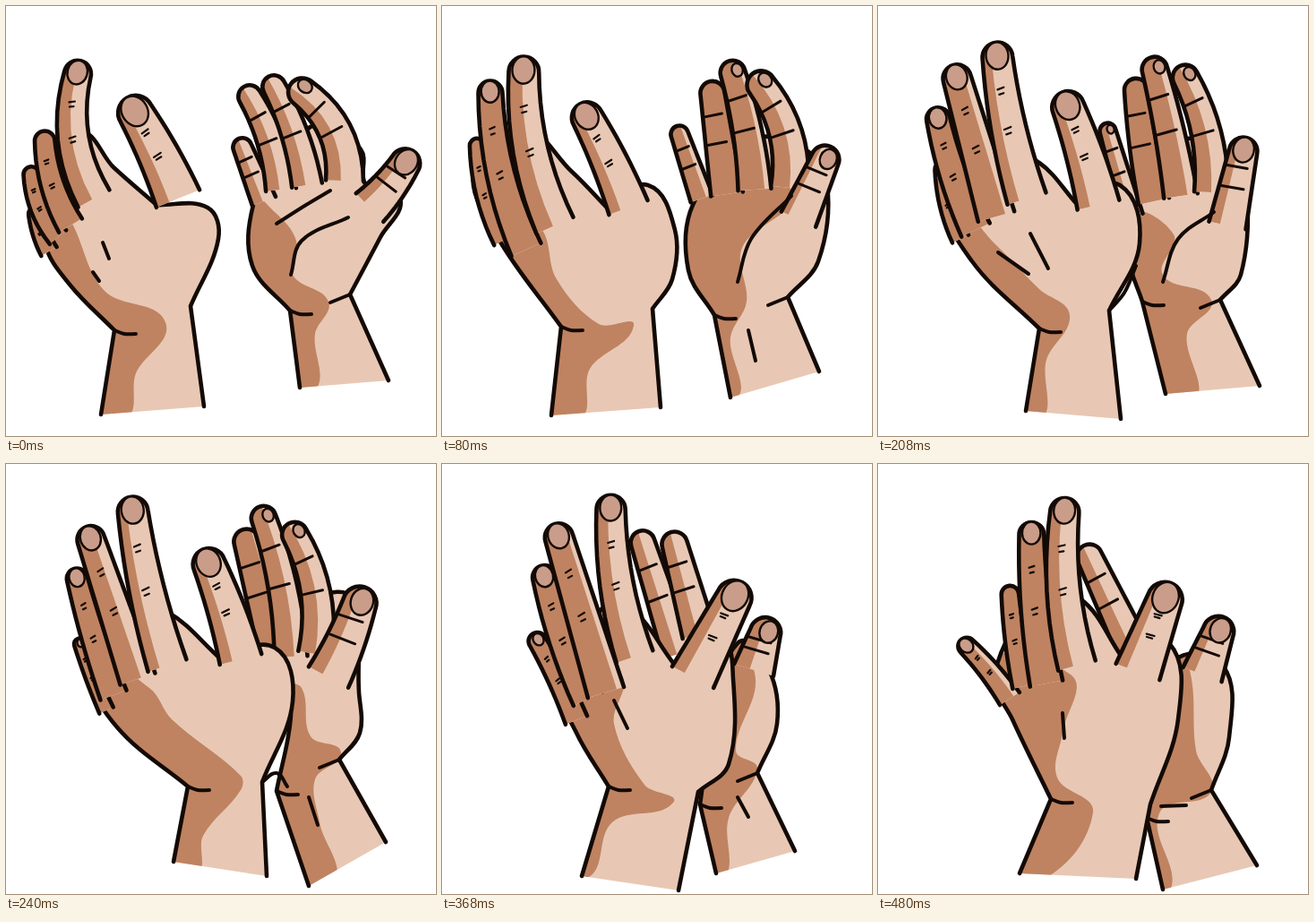
An HTML page with a canvas that plays this animation: 480x480 px, repeating every 0.56 s.

```html
<!DOCTYPE html>
<html lang="en">
<head>
<meta charset="utf-8">
<title>Clapping hands</title>
<style>
html, body { margin: 0; width: 100%; height: 100%; overflow: hidden; background: #fff; }
canvas { display: block; }
</style>
</head>
<body>
<canvas id="stage" width="480" height="480"></canvas>
<script>
const ctx = document.getElementById('stage').getContext('2d');
const STEP = 80, INK = '#130a06', LIGHT = '#e8c8b4', DARK = '#bf8361', NAIL = '#ca9d8a';
let back; // true while drawing a hand seen from its back

// Smooth curve through "x y x y ..."; a bar after a point makes it a corner.
function curve(text, closed) {
  const n = text.replace(/(\S+ \S+)\|/g, '$1 $1').split(' ').map(Number);
  const pts = [];
  while (n.length) pts.push(n.splice(0, 2));
  const size = pts.length;
  const at = i => pts[closed ? (i + size) % size : Math.max(0, Math.min(size - 1, i))];
  const heading = i => {
    const [a, b] = at(i - 1), [c, d] = at(i + 1), len = Math.hypot(c - a, d - b) || 1;
    return [(c - a) / len, (d - b) / len];
  };
  const path = new Path2D();
  path.moveTo(...pts[0]);
  for (let i = 0; i < size - !closed; i++) {
    const [x, y] = at(i), [u, v] = at(i + 1), k = Math.hypot(u - x, v - y) * 0.35;
    const [a, b] = heading(i), [c, d] = heading(i + 1);
    path.bezierCurveTo(x + a * k, y + b * k, u - c * k, v - d * k, u, v);
  }
  return path;
}

function fill(path, color) {
  ctx.fillStyle = color;
  ctx.fill(path);
}

function stroke(path, width) {
  ctx.lineWidth = width;
  ctx.stroke(path);
}

function body(outline, shadow) {
  fill(outline, LIGHT);
  ctx.save();
  ctx.clip(outline);
  fill(shadow, DARK);
  ctx.restore();
  stroke(outline, 4.6);
}

function ink(...lines) {
  for (const line of lines) stroke(curve(line), 4);
}

// Palm with wrist, open at the cut; the second point is the wrist corner.
function palm(view, outline, shadow) {
  back = view === 'back';
  body(curve(outline), curve(shadow, true));
  const [x, y] = outline.split(' ').slice(2, 4).map(parseFloat);
  ink(`${x} ${y} ${x + 11} ${y + 4} ${x + 24} ${y + 4}`);
  if (back) return;
  const [u, v] = outline.split(' ').slice(-4, -2).map(parseFloat);
  ink(`${u} ${v} ${u - 22} ${v + 9}`);
}

// Tapered finger from base to tip; tone is the share of its width in shadow.
function finger(bx, by, tx, ty, bend, width, tone = 0.45, nail = back ? 1 : 0) {
  const len = Math.hypot(tx - bx, ty - by), dx = (tx - bx) / len, dy = (ty - by) / len;
  const r = width * 0.375, ex = tx - dx * r, ey = ty - dy * r;
  const cx = (bx + ex) / 2 - dy * bend * 2, cy = (by + ey) / 2 + dx * bend * 2;
  const mix = (a, b, c, t) => (1 - t) ** 2 * a + 2 * t * (1 - t) * b + t * t * c;
  const turn = t => Math.atan2((1 - t) * (cy - by) + t * (ey - cy), (1 - t) * (cx - bx) + t * (ex - cx)) + Math.PI / 2;
  const side = (s, t) => {
    const h = s * width * (0.5 - 0.125 * t), a = turn(t);
    return [mix(bx, cx, ex, t) + Math.cos(a) * h, mix(by, cy, ey, t) + Math.sin(a) * h];
  };
  const outline = new Path2D(), shadow = new Path2D(), a = turn(1);
  const steps = [...Array(11).keys()].map(i => i / 10);
  for (const t of steps) outline.lineTo(...side(-1, t));
  outline.arc(ex, ey, r, a + Math.PI, a + Math.PI * 2);
  for (const t of steps) outline.lineTo(...side(1, 1 - t));
  for (const t of steps) shadow.lineTo(...side(-1.4, t * 1.4));
  for (const t of steps) shadow.lineTo(...side(tone * 2 - 1, (1 - t) * 1.4));
  body(outline, shadow);

  for (const t of [0.5, 0.78]) {
    const crease = new Path2D(), [from, to] = back ? [-0.25, 0.15] : [-0.85, 0.5];
    crease.moveTo(...side(from, t));
    crease.lineTo(...side(to, t + 0.01));
    if (back) {
      crease.moveTo(...side(from + 0.06, t - 0.035));
      crease.lineTo(...side(to - 0.06, t - 0.03));
    }
    stroke(crease, back ? 2.2 : 3);
  }
  if (nail) {
    const shift = (1 - nail) * r, plate = new Path2D();
    plate.ellipse(ex + Math.cos(a) * shift + dx * r * 0.12, ey + Math.sin(a) * shift + dy * r * 0.12,
      r * 0.74 * nail, r * 0.9 * nail, a, 0, Math.PI * 2);
    fill(plate, NAIL);
    stroke(plate, 2.4);
  }
}

function wide() {
  palm('back', '106 456 121 362| 72 312 44 266 45 190 80 140 120 180 168 222| 225 225 237 260 206 335| 221 447',
    '40 180 75 245 110 318 178 353 145 410 133 460 60 440');
  finger(48, 274, 30, 225, -2, 20, 1, 0.8);
  finger(58, 258, 25, 180, -6, 24, 1, 0);
  finger(72, 245, 40, 140, -6, 30, 1, 0);
  finger(98, 215, 78, 61, -14, 40);
  finger(192, 215, 136, 102, 2, 52, 0.3);
  ink('108 264 115 282', '97 297 104 307');

  palm('front', '328 426 317 340| 275 290 276 222 300 190 350 130 396 160 402 200 440 215 418 258 384 322| 427 418',
    '270 210 300 230 324 262 320 300 360 330 345 366 344 430 290 420');
  finger(288, 218, 260, 148, 0, 28);
  finger(307, 205, 268, 89, 6, 34);
  finger(336, 200, 295, 78, 5, 34);
  finger(378, 195, 324, 82, 14, 42, 0.4, 0.6);
  finger(406, 225, 456, 163, 2, 44, 0.3, 1);
  ink('302 243 335 222 362 206', '318 300 330 262 382 236');
}

function near() {
  palm('back', '122 457 133 358| 62 258 35 185 80 130 145 185 184 225| 230 200 260 250 257 305 235 338| 244 448',
    '30 150 112 250 128 305 175 355 214 357 165 405 152 460 60 420');
  finger(68, 262, 37, 148, -6, 22, 1, 0);
  finger(94, 272, 51, 84, -9, 36, 1);
  finger(126, 245, 88, 57, -10, 45);
  finger(208, 225, 155, 109, 2, 46, 0.3);

  palm('front', '322 437 304 345| 275 295 280 222 340 150 405 160 430 200 420 285 386 325| 421 408',
    '275 200 390 205 335 270 340 330 322 370 326 440 270 400');
  finger(290, 215, 262, 134, 0, 26, 0.7);
  finger(318, 210, 300, 84, 0, 36, 1);
  finger(349, 205, 322, 61, 4, 37, 0.8, 0.6);
  finger(388, 203, 352, 73, 12, 42, 0.5, 0.6);
  finger(398, 238, 434, 157, 0, 42, 0.2, 0.8);
  ink('330 308 345 260 390 212', '342 362 350 396');
}

function meeting() {
  palm('front', '321 433 295 330| 280 280 290 220 340 150 395 170 412 215 405 300 382 328| 426 424',
    '280 235 330 255 318 300 372 328 345 366 350 440 270 400');
  finger(284, 235, 254, 131, 0, 24, 0.5, 0.6);
  finger(308, 218, 286, 81, -2, 35, 1);
  finger(338, 212, 306, 57, 2, 38, 0.7, 0.6);
  finger(372, 208, 340, 66, 9, 38, 0.5, 0.6);
  finger(390, 245, 411, 147, 0, 42, 0.3, 1);
  ink('318 308 335 260 375 230');

  palm('back', '165 452 180 360| 105 285 75 215 120 150 180 175 221 220| 270 200 292 265 258 340| 271 461',
    '90 230 130 265 180 316 214 345 188 395 178 460 120 400');
  finger(92, 260, 69, 175, -4, 20, 1, 0);
  finger(109, 250, 63, 114, -4, 35, 1);
  finger(132, 235, 84, 66, 0, 42, 0.75);
  finger(166, 215, 130, 41, -4, 45, 0.3);
  finger(246, 222, 207, 96, 2, 48, 0.3);
  ink('134 275 168 299', '170 254 190 293', '258 340 275 320 288 290');
}

function touching() {
  palm('front', '338 471 302 365| 318 280 310 215 350 150 385 150 394 255 395 300 372 330| 424 422',
    '310 250 330 250 340 304 374 322 345 352 350 400 365 470 300 460');
  finger(300, 205, 265, 73, 0, 38, 0.8);
  finger(318, 215, 285, 47, 6, 37, 0.6, 0.6);
  finger(345, 212, 320, 65, 12, 38, 0.5, 0.6);
  finger(360, 238, 402, 138, 2, 50, 0.35, 0.9);
  ink('338 372 348 403');

  palm('back', '187 444 203 360| 125 295 95 235 120 150 180 165 239 217| 300 205 320 265 286 355| 291 460',
    '80 210 160 250 185 285 262 348 262 364 220 415 212 455 120 420');
  finger(112, 275, 80, 195, -1, 17, 1, 0.8);
  finger(120, 258, 76, 117, -2, 31, 1);
  finger(147, 240, 90, 70, 0, 41, 0.6);
  finger(180, 225, 138, 37, -4, 45, 0.3);
  finger(262, 218, 221, 95, 2, 48, 0.3);
  ink('286 355 302 345 314 360');
}

function pressed() {
  palm('front', '306 457 288 380| 300 300 330 200 365 230 374 290 352 345| 394 432',
    '320 190 350 240 328 320 352 340 320 395 314 465 270 455');
  finger(264, 212, 220, 75, 0, 36);
  finger(287, 190, 256, 76, 0, 38);
  finger(348, 230, 366, 172, 0, 46, 0.4, 0.8);
  ink('330 372 342 394');

  palm('back', '156 460 186 360| 150 300 130 240 180 160 210 160 258 222| 310 195 325 240 320 335 286 366| 264 476',
    '120 200 200 235 192 290 226 358 258 378 190 400 162 462 100 440');
  finger(150, 286, 102, 189, 2, 26, 1, 0.8);
  finger(163, 262, 110, 114, -4, 36, 1);
  finger(183, 255, 126, 67, 0, 42, 0.8);
  finger(215, 215, 186, 35, -7, 43, 0.4);
  finger(280, 238, 335, 132, 0, 52, 0.3);
  ink('192 264 207 295');
}

function closed() {
  palm('front', '335 470 298 400| 300 300 325 215 376 230 384 285 362 350| 413 432',
    '325 200 355 240 340 345 328 395 340 475 280 440');
  finger(280, 208, 226, 80, 0, 38);
  finger(355, 240, 374, 179, 0, 46, 0.4, 0.9);
  ink('314 372 334 376', '336 392 361 436');

  palm('back', '165 468 200 380| 155 300 130 220 180 150 225 140 272 220| 325 200 332 285 282 398| 285 466',
    '120 200 232 215 214 300 222 362 262 400 190 435 176 470 120 470');
  finger(148, 285, 112, 197, 0, 25, 1);
  finger(167, 278, 134, 105, -6, 36, 1);
  finger(190, 268, 160, 64, -3, 38, 1);
  finger(226, 235, 187, 34, 0, 43, 0.6);
  finger(298, 235, 328, 137, 0, 52, 0.25);
  ink('214 290 212 318');
}

function parting() {
  palm('front', '318 475 300 395| 305 300 330 220 385 225 392 305 372 364| 423 448',
    '335 205 350 240 355 320 372 366 314 390 325 478 280 450');
  finger(285, 207, 230, 91, 0, 38);
  finger(362, 235, 386, 171, 0, 46, 0.3, 0.9);
  ink('316 382 344 381');

  palm('back', '158 457 193 374| 150 285 130 235 180 150 225 150 272 215| 325 200 335 285 304 380| 288 463',
    '110 230 215 235 206 300 200 350 240 389 182 465 120 450');
  finger(147, 262, 93, 196, 2, 26, 0.7);
  finger(163, 248, 146, 136, -2, 26, 1, 0);
  finger(188, 245, 170, 65, -4, 37, 1);
  finger(222, 225, 207, 38, -8, 43, 0.4);
  finger(290, 232, 327, 133, 0, 52, 0.25);
  ink('206 278 208 306');
}

const poses = [wide, near, meeting, touching, pressed, closed, parting];
ctx.lineCap = ctx.lineJoin = 'round';
ctx.strokeStyle = INK;

function draw() {
  ctx.clearRect(0, 0, 480, 480);
  poses[Math.floor(performance.now() / STEP) % poses.length]();
  requestAnimationFrame(draw);
}
draw();
</script>
</body>
</html>
```
